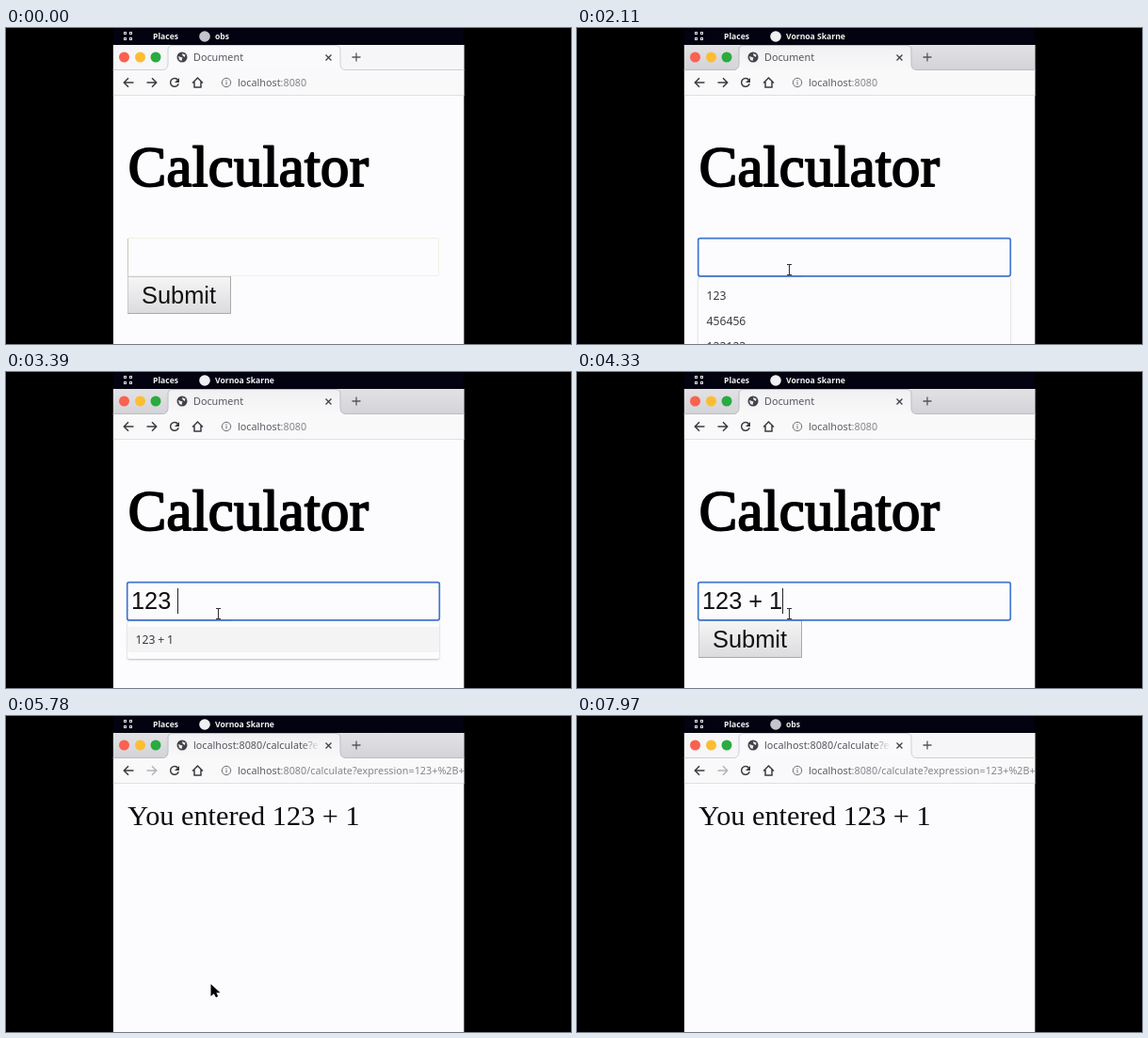
An HTML page with a canvas for the animation above (8.09 s loop, 600 by 336 pixels).

```html
<!DOCTYPE html>
<html lang="en">
<head>
<meta charset="utf-8">
<title>Calculator demo</title>
<style>
  html, body { margin: 0; width: 100%; height: 100%; overflow: hidden; background: #000; }
  canvas { display: block; width: 100vw; height: 100vh; }
</style>
</head>
<body>
<canvas id="stage" width="600" height="336"></canvas>
<script>
const ctx = document.getElementById('stage').getContext('2d');
const LOOP = 8090;
const UI = '"Noto Sans", sans-serif';
const SANS = '"Liberation Sans", Arial, sans-serif';
const SERIF = '"Liberation Serif", Times, serif';
const PAGE = '#fcfcfe';
const LEFT = 113.7, WIDTH = 372.9;

// Script of the recording, in ms
const FOCUS = 1550, DROPDOWN = 1850, SUBMIT = 5250, BLUR = 6900;
const KEYS = [[2600, '1'], [2750, '2'], [2900, '3'], [3250, ' '], [3600, '+'], [3850, ' '], [4100, '1']];
const HISTORY = ['123', '456456', '123123', '123 + 1'];
const POINTER = [[950, 430, 345], [1450, 225, 257], [4450, 225, 257], [4900, 217, 285], [6150, 217, 285], [6750, 330, 345]];

function text(str, x, y, font, color) {
  ctx.font = font;
  ctx.fillStyle = color;
  ctx.fillText(str, x, y);
}

function rect(x, y, w, h, color) {
  ctx.fillStyle = color;
  ctx.fillRect(x, y, w, h);
}

function disc(x, y, r, color) {
  ctx.fillStyle = color;
  ctx.beginPath();
  ctx.arc(x, y, r, 0, Math.PI * 2);
  ctx.fill();
}

function stroke(path, color, width = 1) {
  ctx.strokeStyle = color;
  ctx.lineWidth = width;
  ctx.stroke(new Path2D(path));
}

function fill(path, color) {
  ctx.fillStyle = color;
  ctx.fill(new Path2D(path));
}

function gradient(x0, y0, x1, y1, ...colors) {
  const g = ctx.createLinearGradient(x0, y0, x1, y1);
  colors.forEach((c, i) => g.addColorStop(i / (colors.length - 1), c));
  return g;
}

function drawTopBar(active) {
  rect(LEFT, 0, WIDTH, 18, '#020210');
  ctx.strokeStyle = '#dcdce8';
  ctx.lineWidth = 1;
  for (const x of [125.5, 131.5])
    for (const y of [4.5, 10.5]) ctx.strokeRect(x, y, 2, 2);
  text('Places', 156, 12, `bold 8.6px ${UI}`, '#f2f2f6');
  disc(211, 9, 5.8, active ? '#f0f0f4' : '#c4c4cc');
  text(active ? 'Vornoa Skarne' : 'obs', 222, 12, `bold 8.6px ${UI}`, '#f2f2f6');
}

function drawTabs(active, title) {
  rect(LEFT, 18, WIDTH, 27, active ? gradient(0, 18, 0, 45, '#e2e2e5', '#d3d3d8') : '#f6f6f8');
  const tab = 'Q172 44.5 172 38V23Q172 18.5 177 18.5H350Q355 18.5 355 23V38Q355 44.5 361 44.5';
  fill('M166 45' + tab + 'V45Z', active ? gradient(0, 18, 0, 45, '#f0f0f2', '#f9f9fa') : '#fafafc');
  stroke('M113 44.5H166' + tab + 'H487', active ? '#bcbcc4' : '#cfcfd6');
  disc(125.5, 31, 5.5, '#fb6150');
  disc(142.5, 31, 5.5, '#fdbd32');
  disc(159, 31, 5.5, '#2aab40');

  disc(187, 31, 5.5, '#42424a');
  fill('M183 30L187.5 31.5L186.5 35L184 34ZM187 27L190.5 28.5L190 31L187.5 29.5Z', '#e8e8ee');

  const ink = '#55555e';
  const faded = gradient(199, 0, 333, 0, ...Array(7).fill(ink), ink + '00');
  ctx.save();
  ctx.beginPath();
  ctx.rect(199, 18, 134, 26);
  ctx.clip();
  text(title, 199, 35, `10.8px ${UI}`, faded);
  ctx.restore();
  stroke('M339.5 28.5L345.5 34.5M345.5 28.5L339.5 34.5', '#45454d', 1.4);
  stroke('M367.5 31H376.5M372 26.5V35.5', ink, 1.3);
}

function drawToolbar(url, canForward) {
  rect(LEFT, 45, WIDTH, 27, '#f9f9fa');
  rect(LEFT, 71, WIDTH, 1, '#dedee3');
  const dark = '#3c3c44';
  stroke('M135.5 58H125.5M130 53.3L125.3 58L130 62.7', dark, 1.5);
  stroke('M149.5 58H159.5M155 53.3L159.7 58L155 62.7', canForward ? dark : '#b4b4bb', 1.5);
  stroke('M182.6 55.4A4.4 4.4 0 1 0 183.2 59.3', dark, 1.5);
  fill('M184 53V58H179Z', dark);
  stroke('M198 58.5L203.5 53L209 58.5M200 57V63H207V57', dark, 1.5);
  ctx.beginPath();
  ctx.arc(234, 58, 4.7, 0, Math.PI * 2);
  ctx.strokeStyle = '#6c6c74';
  ctx.lineWidth = 1;
  ctx.stroke();
  stroke('M234 57.2V60.5M234 55.2V56.3', '#6c6c74');
  const host = 'localhost';
  text(host, 246, 62, `10.8px ${UI}`, '#5c5c64');
  text(url.slice(host.length), 246 + ctx.measureText(host).width, 62, `10.8px ${UI}`, '#85858d');
}

function drawHeading() {
  ctx.lineJoin = 'round';
  ctx.letterSpacing = '0.3px';
  ctx.font = `60.6px ${SERIF}`;
  ctx.strokeStyle = '#000';
  ctx.lineWidth = 2;
  ctx.strokeText('Calculator', 129.8, 167.7);
  text('Calculator', 129.8, 167.7, ctx.font, '#000');
  ctx.letterSpacing = '0px';
}

function drawSubmit(hover) {
  rect(129, 264, 110, 40, gradient(0, 264, 0, 304, '#f6f6f6', hover ? '#e6e6ea' : '#dbdbde'));
  stroke('M129.5 303V264.5H238', '#c9c9cc');
  stroke('M129 303.5H238.5V264', '#a9a9ad');
  text('Submit', 144, 292.5, `25.4px ${SANS}`, '#111');
}

function drawDropdown(rows) {
  const height = rows.length * 27 + 13;
  ctx.save();
  ctx.shadowColor = '#00000050';
  ctx.shadowBlur = 2;
  ctx.shadowOffsetY = 0.7;
  ctx.beginPath();
  ctx.roundRect(129, 265, 331, height, 2);
  ctx.fillStyle = PAGE;
  ctx.fill();
  ctx.restore();
  if (rows.length === 1) rect(129, 271, 331, 27, '#f4f4f5');
  ctx.wordSpacing = '-0.4px';
  rows.forEach((row, i) => text(row, 137.5, 288.5 + i * 27, `12.2px ${UI}`, '#3a3a42'));
  ctx.wordSpacing = '0px';
}

function drawForm(t) {
  drawHeading();
  drawSubmit(t > 4700);
  if (t < FOCUS) {
    ctx.strokeStyle = '#f1f1e4';
    ctx.lineWidth = 1;
    ctx.strokeRect(129.5, 223.5, 330, 40);
    stroke('M129.5 224V264', '#c4c8b8');
    return;
  }

  const typed = KEYS.filter(([at]) => t >= at);
  const value = typed.map(([, key]) => key).join('');
  const rows = HISTORY.filter(row => row.startsWith(value) && row !== value);
  if (t >= DROPDOWN && rows.length) drawDropdown(rows);

  ctx.beginPath();
  ctx.roundRect(128.7, 223.6, 331.6, 40.2, 2);
  ctx.fillStyle = PAGE;
  ctx.fill();
  ctx.strokeStyle = '#4176cf';
  ctx.lineWidth = 1.7;
  ctx.stroke();
  text(value, 133, 252, `25.3px ${SANS}`, '#111');
  const lastAction = typed.length ? typed[typed.length - 1][0] : FOCUS;
  if ((t - lastAction) % 1000 < 500)
    rect(Math.round(133 + ctx.measureText(value).width), 230, 1, 27, '#222');
}

function drawPointer(t) {
  const next = POINTER.findIndex(([at]) => at > t);
  if (next < 1) return;
  const [t0, x0, y0] = POINTER[next - 1], [t1, x1, y1] = POINTER[next];
  const p = (t - t0) / (t1 - t0), ease = p * p * (3 - 2 * p);
  const x = x0 + (x1 - x0) * ease, y = y0 + (y1 - y0) * ease;
  const overInput = t < SUBMIT && x > 129 && x < 460 && y > 223 && y < 264;
  ctx.save();
  ctx.translate(x, y);
  if (overInput) {
    stroke('M-2 -5.5H3M0.5 -5.5V5.5M-2 5.5H3', '#33333a', 1.1);
  } else {
    const arrow = 'M0.5 0V13L3.8 10.2L6 14.2L8.2 13L6.3 9.2H10.5Z';
    stroke(arrow, '#fff', 2);
    fill(arrow, '#000');
  }
  ctx.restore();
}

function draw(t) {
  const active = t >= FOCUS && t < BLUR;
  const submitted = t >= SUBMIT;
  const url = 'localhost:8080' + (submitted ? '/calculate?expression=123+%2B+1' : '');
  rect(0, 0, 600, 336, '#000');
  ctx.save();
  ctx.beginPath();
  ctx.rect(LEFT, 0, WIDTH, 336);
  ctx.clip();
  rect(LEFT, 18, WIDTH, 318, PAGE);
  drawTopBar(active);
  drawTabs(active, submitted ? url : 'Document');
  drawToolbar(url, !submitted);
  if (submitted) text('You entered 123 + 1', 129.3, 116, `30.3px ${SERIF}`, '#0c0c0c');
  else drawForm(t);
  drawPointer(t);
  ctx.restore();
}

function tick() {
  draw(performance.now() % LOOP);
  requestAnimationFrame(tick);
}
tick();
</script>
</body>
</html>
```
